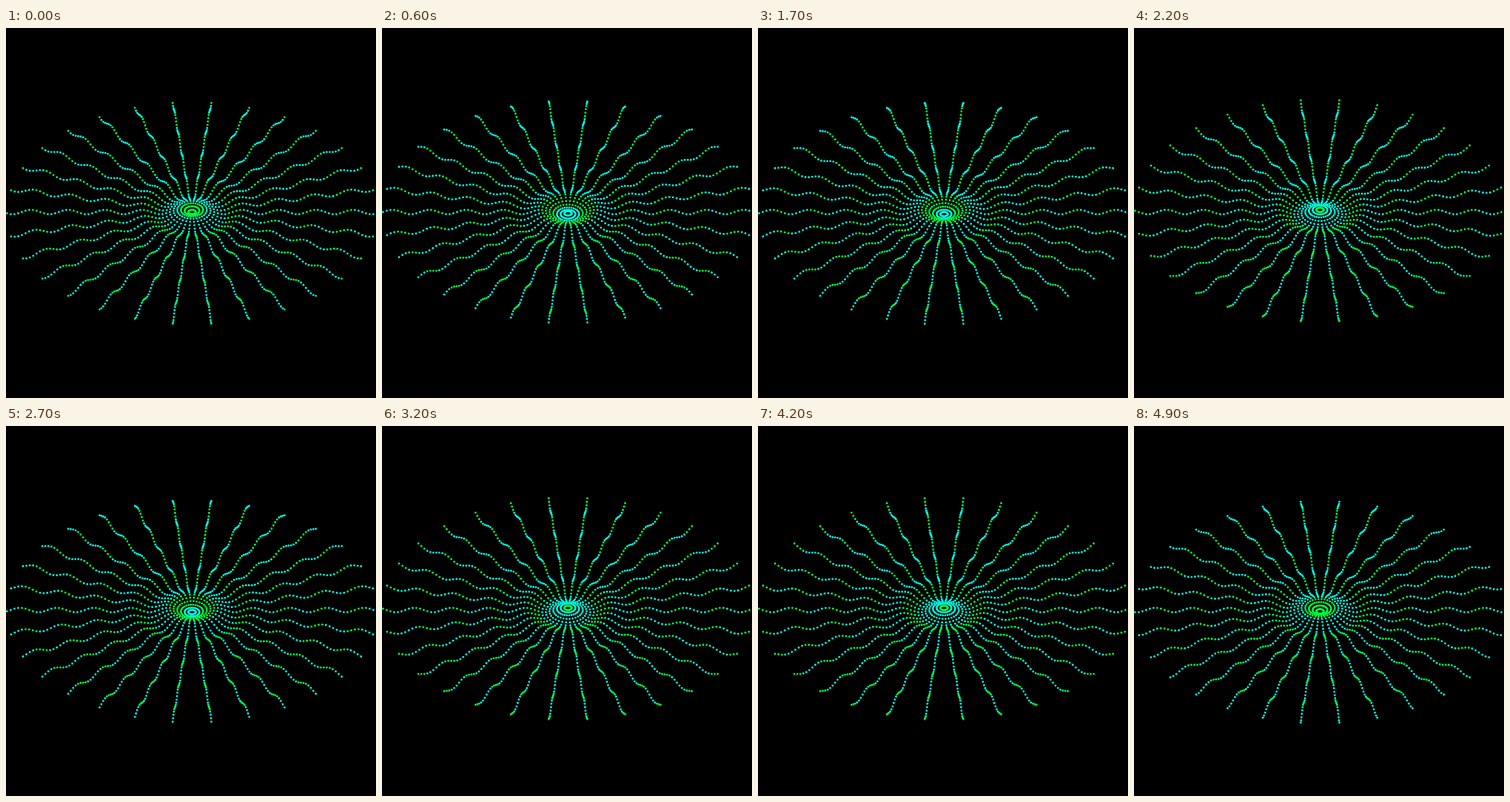
These frames come from a looping animation (500x500 px, 5 s). An HTML page with a canvas:

```html
<!DOCTYPE html>
<html lang="en">
<head>
<meta charset="utf-8">
<title>Ripple</title>
<style>
  html, body { margin: 0; height: 100%; overflow: hidden; background: #000; }
  canvas { display: block; }
</style>
</head>
<body>
<canvas id="stage" width="500" height="500"></canvas>
<script>
const ctx = document.getElementById('stage').getContext('2d');
const TAU = Math.PI * 2;
const CX = 251.4, CY = 248.7, TILT = 0.6;
const RAYS = 30, DOTS = 50, GAP = 5, DOT = 1.4;
const WAVE = 50, HEIGHT = 3;
const GREEN = '#00ff3c', CYAN = '#00ffe1';

function draw(time) {
  // ten held poses per second
  const beat = Math.floor(time / 100) % 10 / 10;
  ctx.fillStyle = '#000';
  ctx.fillRect(0, 0, 500, 500);
  for (let i = 1; i <= DOTS; i++) {
    const r = i * GAP;
    const phase = (beat + 0.15 + r / WAVE) % 1;
    const y = CY + HEIGHT * Math.cos(phase * TAU);
    ctx.fillStyle = phase > 0.1 && phase < 0.5 ? GREEN : CYAN;
    for (let k = 0; k < RAYS; k++) {
      const a = k / RAYS * TAU;
      ctx.beginPath();
      ctx.arc(CX + r * Math.cos(a), y + r * TILT * Math.sin(a), DOT, 0, TAU);
      ctx.fill();
    }
  }
}

const start = performance.now();
function tick() {
  draw(performance.now() - start);
  requestAnimationFrame(tick);
}
tick();
</script>
</body>
</html>
```
